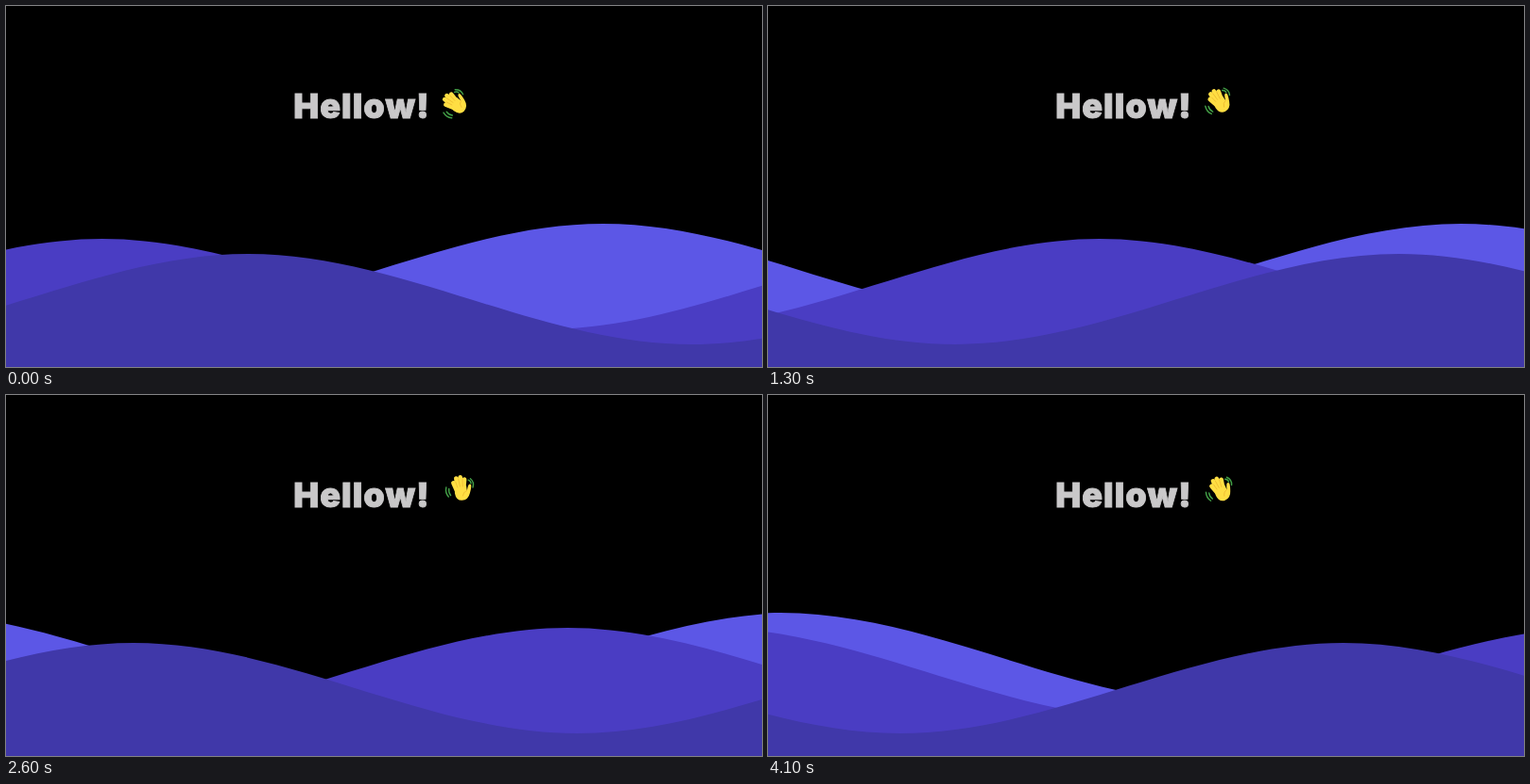
Write an HTML page that moves like this. It is 800x383 px and loops after 4200 ms.

```html
<!DOCTYPE html>
<html lang="en">
<head>
<meta charset="utf-8">
<title>Hellow!</title>
<style>
  html, body { margin: 0; width: 100%; height: 100%; overflow: hidden; background: #000; }
  svg { display: block; width: 800px; height: 383px; }
  .title { font: 900 36px Inter, sans-serif; letter-spacing: 1px; fill: #c9c8c9; stroke: #c9c8c9; stroke-width: .8px; }
  .fingers { fill: none; stroke: #ffde43; stroke-width: 4.6; stroke-linecap: round; }
  .creases { fill: none; stroke: #eab52f; stroke-width: .7; stroke-linecap: round; }
  .motion { fill: none; stroke: #43a047; stroke-width: 1.4; stroke-linecap: round; }
</style>
</head>
<body>
<svg viewBox="0 0 800 383">
  <defs>
    <path id="swell" d="M-160 44c30 0 58-18 88-18s58 18 88 18 58-18 88-18 58 18 88 18v44h-352z"/>
  </defs>

  <text class="title" x="304.2" y="118.8">Hellow!</text>

  <g id="hand">
    <path class="fingers" d="M478 102L474.2 93.2M479.5 99L477.2 88.5M482.5 98L481.6 87.2M485 99L486 89.5"/>
    <path fill="#ffde43" d="M475.7 97L487.8 96Q488.3 100 488.6 101.3Q489.2 97.5 490.2 95.5Q491.8 93.6 493 95.6Q493.4 98 491.6 104Q489.8 111.4 483 111.8Q476.8 111.6 475.6 104Z"/>
    <path class="creases" d="M478.6 98L476.6 92M481.2 97L479.6 89M484 97L484 89.5M488.4 101.5Q484.5 102.5 484 107"/>
    <path class="motion" d="M492.3 88.8Q496.8 92.7 494.8 98.2M490 90.2Q493 91.5 492.8 94M466.6 97.6Q465.2 103.4 468.9 107.8M469.5 99.2Q468.8 103.4 471.2 106.3"/>
  </g>

  <g id="waves"></g>
</svg>
<script>
  const LOOP = 4200, STEP = 100;
  const SCALE = 800 / 150;
  const RATE = 1.004;

  // start: share of the drift already covered; period in ms
  const waves = [
    { color: '#5c57e6', y: 92.33, period: 12000, start: .3226 },
    { color: '#4a3dc3', y: 108.33, period: 5000, start: .7606 },
    { color: '#4038a9', y: 124.33, period: 3000, start: .926 }
  ];

  const layer = document.getElementById('waves');
  const hand = document.getElementById('hand');

  for (const wave of waves) {
    wave.el = document.createElementNS(layer.namespaceURI, 'use');
    wave.el.setAttribute('href', '#swell');
    wave.el.setAttribute('fill', wave.color);
    layer.append(wave.el);
  }

  function draw(t) {
    for (const { el, y, period, start } of waves) {
      const p = (start + t * RATE / period) % 1;
      const x = (175 * p - 42) * SCALE;
      el.setAttribute('transform', `translate(${x} ${y}) scale(${SCALE})`);
    }
    const swing = -Math.cos(2 * Math.PI * (.017 + t * .00212));
    hand.setAttribute('transform', `translate(-.6 0) rotate(${22 * swing - 22.5} 484 109)`);
  }

  function tick() {
    const t = performance.now() % LOOP;
    draw(Math.floor(t / STEP) * STEP);
    requestAnimationFrame(tick);
  }
  tick();
</script>
</body>
</html>
```
